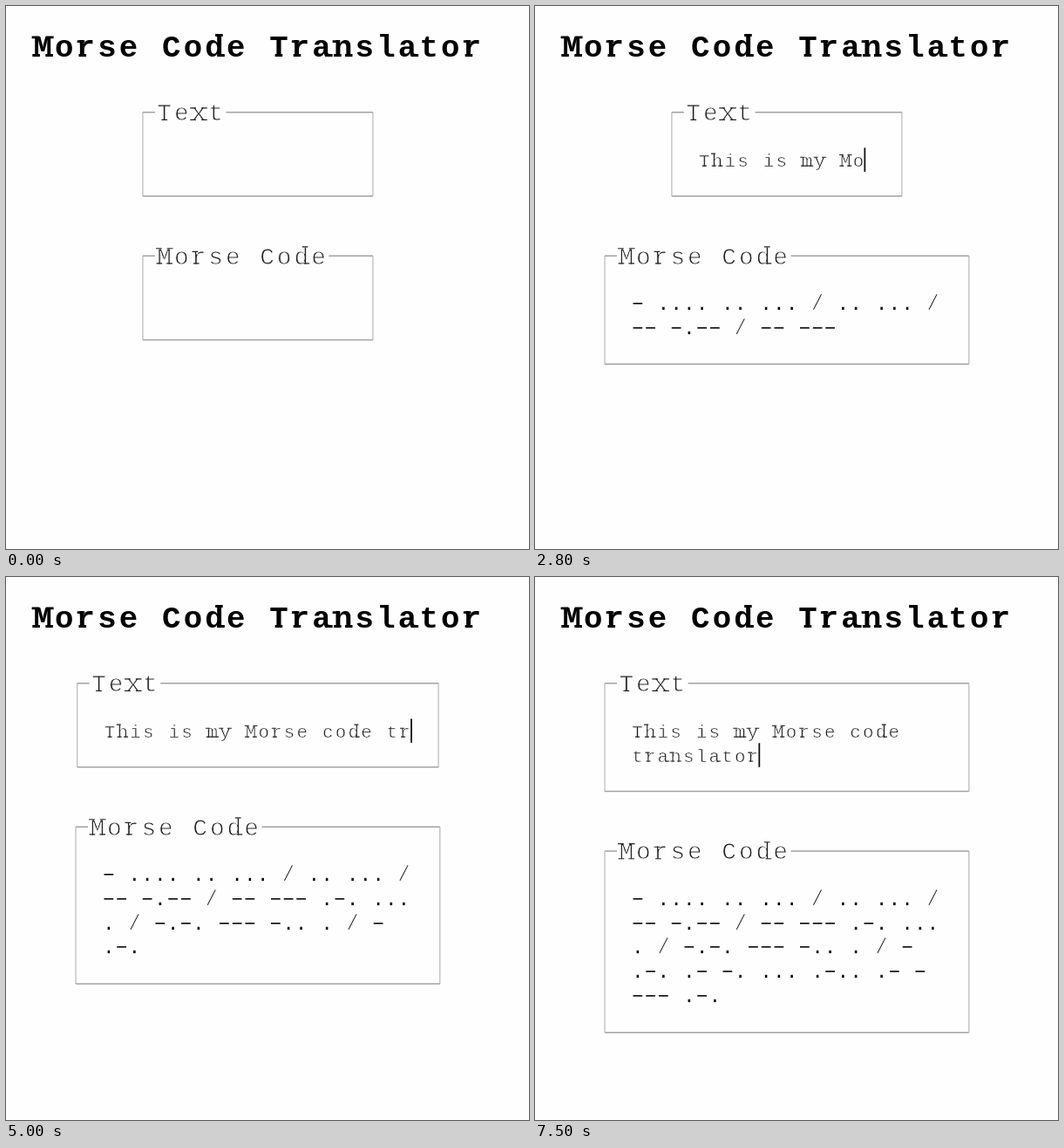
Animation of 600x622 px, one loop 8 s. Source, as an HTML page:

```html
<!DOCTYPE html>
<html lang="en">
<head>
<meta charset="utf-8">
<title>Morse Code Translator</title>
<style>
  html, body { margin: 0; width: 100%; height: 100%; overflow: hidden; background: #fffeff; }
  svg { display: block; width: 600px; height: 622px; }
  text { font-family: "Liberation Mono", "Courier New", monospace; white-space: pre; }
</style>
</head>
<body>
<svg id="stage" viewBox="0 0 600 622"></svg>
<script>
const LOOP = 8000, CENTER = 288.9, LINE = 27.85, PITCH = 14.72;
const MIN_WIDTH = 264, MAX_WIDTH = 417.8, INSET = 30.6, COLUMNS = 24;
const BACKGROUND = '#fffeff', FOCUS_AT = 100, BLINK = 500;

const SENTENCE = 'This is my Morse code translator';
const KEY_TIMES = [
  300, 700, 800, 1000, 1100, 1300, 1400, 1500, 1800, 1900, 2100,
  2600, 2700, 2900, 3100, 3200, 3600, 3700, 3800, 4000, 4100, 4300,
  4800, 5000, 5200, 5400, 5700, 5800, 5900, 6100, 6400, 6500
];
const MORSE = {
  ' ': '/', a: '.-', c: '-.-.', d: '-..', e: '.', h: '....', i: '..', l: '.-..',
  m: '--', n: '-.', o: '---', r: '.-.', s: '...', t: '-', y: '-.--'
};
// Slab serifs as horizontal positions in em: at the baseline and at the letter's top.
const FEET = {
  M: [.09, .51], T: [.3], a: [.53], h: [.12, .48], m: [.08, .3, .52],
  n: [.12, .48], r: [.2], x: [.07, .53], d: [.51]
};
const HEADS = {
  M: [.07, .53], h: [.08], d: [.45], m: [.04], n: [.08], r: [.15], x: [.07, .53], y: [.07, .53]
};
const topOf = char => char === 'M' ? .66 : 'hd'.includes(char) ? .725 : .528;

const stage = document.getElementById('stage');

function add(parent, tag, attrs = {}) {
  const node = document.createElementNS('http://www.w3.org/2000/svg', tag);
  parent.append(node);
  return set(node, attrs);
}

function set(node, attrs) {
  for (const key in attrs) node.setAttribute(key, attrs[key]);
  return node;
}

// Monospaced lines with a fixed pitch; `thin` trims the stems.
function makeType({ pitch, scale = .85, color = '#222', thin = 0, weight = 400, slab = 0 }) {
  const size = pitch / .6 * scale, gap = pitch - size * .6001;
  const group = add(stage, 'g');
  return (lines, x, y) => {
    group.replaceChildren();
    let serifs = '';
    lines.forEach((line, row) => {
      const baseline = y + row * LINE;
      const text = add(group, 'text', {
        x: x + gap / 2, y: baseline, fill: color, 'font-size': size,
        'font-weight': weight, 'letter-spacing': gap,
        stroke: thin ? BACKGROUND : 'none', 'stroke-width': thin
      });
      text.textContent = line;
      [...line].forEach((char, i) => {
        const left = x + i * pitch + gap / 2;
        const bar = (at, y) => serifs += `M${left + (at - .12) * size} ${y}h${size * .24}`;
        (FEET[char] || []).forEach(at => bar(at, baseline - slab / 2));
        (HEADS[char] || []).forEach(at => bar(at, baseline - topOf(char) * size + slab / 2));
      });
    });
    if (slab) add(group, 'path', { d: serifs, stroke: color, 'stroke-width': slab });
  };
}

function makeBox(label) {
  const sides = add(stage, 'path', { fill: 'none', stroke: '#c2c2c2', 'stroke-width': 1.4 });
  const rails = add(stage, 'path', { fill: 'none', stroke: '#a2a2a2', 'stroke-width': 1.5 });
  const legend = makeType({ pitch: 19.65, thin: .9, slab: 1.2 });
  const legendWidth = label.length * 19.65 + 3;
  return (left, top, width, height) => {
    const right = left + width, start = left + 14;
    set(sides, { d: `M${left} ${top}v${height}M${right} ${top}v${height}` });
    set(rails, {
      d: `M${left} ${top}H${start}M${start + legendWidth} ${top}H${right}M${left} ${top + height}H${right}`
    });
    legend([label], start + 1, top + 9.3);
  };
}

function wrap(text) {
  const lines = [''];
  for (const word of text.match(/\S+ ?| /g) || []) {
    const last = lines.length - 1;
    if (lines[last] && (lines[last] + word.trimEnd()).length > COLUMNS) lines.push(word);
    else lines[last] += word;
  }
  return lines;
}

function boxWidth(lines) {
  if (lines.length > 1) return MAX_WIDTH;
  return Math.min(MAX_WIDTH, Math.max(MIN_WIDTH, lines[0].length * PITCH + 2 * INSET));
}

makeType({ pitch: 24.62, scale: .87, color: '#000', weight: 700, slab: 2.9 })(
  ['Morse Code Translator'], 29.8, 58);
const inputBox = makeBox('Text');
const inputType = makeType({ pitch: PITCH, thin: .6, slab: 1.1 });
const morseBox = makeBox('Morse Code');
const markType = makeType({ pitch: PITCH, scale: .9, color: '#000' });
const slashType = makeType({ pitch: PITCH, scale: .95, thin: .7 });
const caret = add(stage, 'rect', { width: 1.8, height: 27.5, fill: '#111' });

function layOut(count) {
  const typed = SENTENCE.slice(0, count);
  const input = wrap(typed);
  const code = wrap([...typed.toLowerCase()].map(char => MORSE[char]).join(' '));
  const inputWidth = boxWidth(input), morseWidth = boxWidth(code);
  const inputLeft = CENTER - inputWidth / 2, morseLeft = CENTER - morseWidth / 2;
  const extra = (input.length - 1) * LINE;
  const inputTop = 121.7, morseTop = 286.2 + extra;
  const morseX = morseLeft + INSET, morseY = morseTop + 61.6;

  inputBox(inputLeft, inputTop, inputWidth, 96 + extra);
  inputType(input, inputLeft + INSET - .5, inputTop + 62);
  morseBox(morseLeft, morseTop, morseWidth, 96.2 + (code.length - 1) * LINE);
  // The minus sign has the long stroke a Morse dash needs.
  markType(code.map(line => line.replace(/-/g, '\u2212').replace(/\//g, ' ')), morseX, morseY);
  slashType(code.map(line => line.replace(/[^/]/g, ' ')), morseX, morseY);
  set(caret, {
    x: inputLeft + INSET + input[input.length - 1].length * PITCH - 1.4,
    y: 162.4 + extra
  });
}

let shown = -1;

function update(time) {
  const count = KEY_TIMES.filter(key => key <= time).length;
  if (count !== shown) layOut(shown = count);
  const since = time - (count ? KEY_TIMES[count - 1] : FOCUS_AT);
  const visible = since >= 0 && Math.floor(since / BLINK) % 2 === 0;
  set(caret, { visibility: visible ? 'visible' : 'hidden' });
}

const begin = performance.now();
function tick() {
  update((performance.now() - begin) % LOOP);
  requestAnimationFrame(tick);
}
tick();
</script>
</body>
</html>
```
